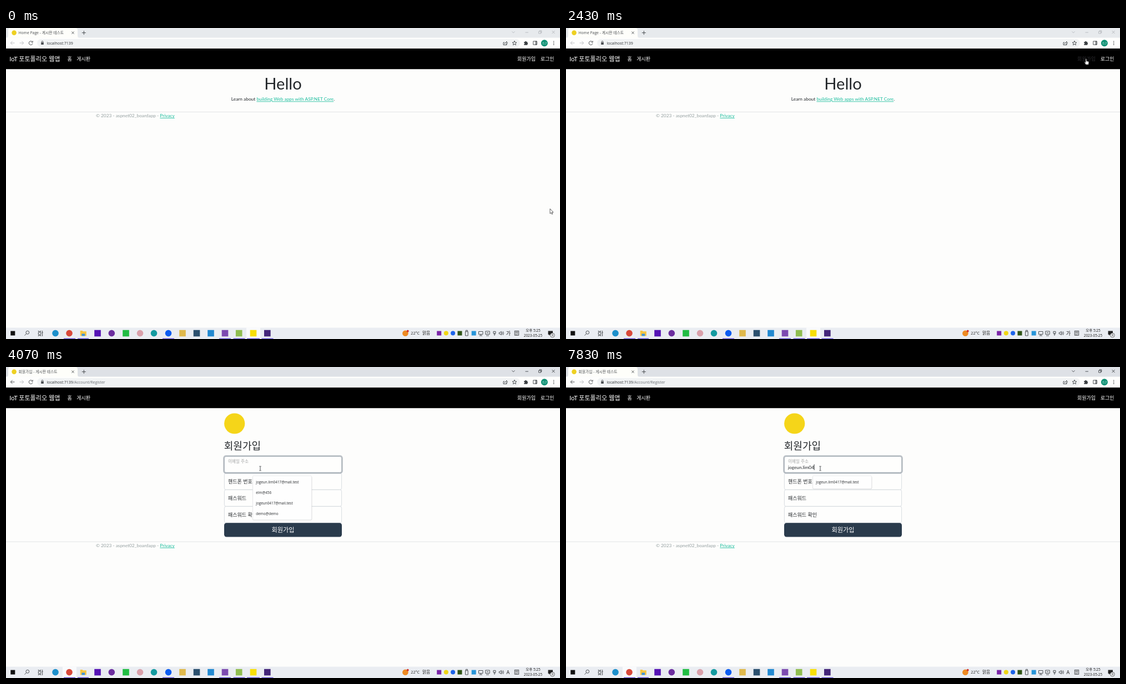
An HTML page for the animation above (8000 ms loop, 998 px wide and 561 px high).

```html
<!DOCTYPE html>
<html lang="ko">
<head>
<meta charset="utf-8">
<title>회원가입</title>
<style>
html, body { margin: 0; width: 100%; height: 100%; overflow: hidden; background: #fdfdfc; }
svg { display: block; width: 998px; height: 561px; font-family: Lato, "Noto Sans CJK KR", sans-serif; fill: #212529; }
.ui { font-family: "Open Sans", "Noto Sans CJK KR", sans-serif; }
.mid { text-anchor: middle; }
.link { fill: #18bc9c; text-decoration: underline; }
.line { fill: none; stroke: #3c4043; stroke-width: .9; }
.pale { stroke: #b4b7bb; }
.box { fill: #fefefd; stroke: #ced4da; stroke-width: .8; }

/* 1% of the loop is 80 ms */
.home, .register, .idle, .active, .tray-ko, .tray-off, .tray-en, .arrow, .hand, .beam {
  animation: 8s step-end infinite;
}
.home { animation-name: until-load; }
.register { animation-name: from-load; }
.idle { animation-name: until-click; }
.active { animation-name: from-click; }
.tray-ko { animation-name: until-click; }
.tray-off { animation-name: tray-off; }
.tray-en { animation-name: tray-en; }
.arrow { animation-name: arrow; }
.hand { animation-name: hand; }
.beam { animation-name: beam; }
@keyframes until-load { 0% { visibility: visible } 33%, 100% { visibility: hidden } }
@keyframes from-load { 0% { visibility: hidden } 33%, 100% { visibility: visible } }
@keyframes until-click { 0% { visibility: visible } 32%, 100% { visibility: hidden } }
@keyframes from-click { 0% { visibility: hidden } 32%, 100% { visibility: visible } }
@keyframes tray-off { 0% { visibility: hidden } 32% { visibility: visible } 44%, 100% { visibility: hidden } }
@keyframes tray-en { 0% { visibility: hidden } 44%, 100% { visibility: visible } }
@keyframes arrow {
  0% { visibility: visible } 27.4% { visibility: hidden }
  37.3% { visibility: visible } 39.8%, 100% { visibility: hidden }
}
@keyframes hand { 0% { visibility: hidden } 27.4% { visibility: visible } 37.3%, 100% { visibility: hidden } }
@keyframes beam { 0% { visibility: hidden } 39.8%, 100% { visibility: visible } }

.pointer { animation: move 8s ease-in-out infinite; }
@keyframes move {
  0%, 3% { transform: translate(980px, 326px) }
  17.5%, 20% { transform: translate(894.5px, 179px) }
  29.5%, 32.5% { transform: translate(937px, 55.5px) }
  35%, 36.3% { transform: translate(936px, 55.5px) }
  41%, 100% { transform: translate(458px, 183px) }
}
.join { animation: hover 8s linear infinite; }
@keyframes hover {
  0%, 27.4% { fill: #fff }
  29.3%, 32.99% { fill: #2b2b2f }
  33%, 100% { fill: #fff }
}
.ring { opacity: 0; animation: ring 8s ease-in-out infinite; }
@keyframes ring { 0%, 42.88% { opacity: 0 } 44.75%, 100% { opacity: 1 } }
.float { animation: float 8s ease-in-out infinite; }
@keyframes float {
  0%, 42.88% { transform: translate(400px, 179.3px); opacity: 1 }
  44.13%, 100% { transform: translate(400px, 172.7px) scale(.85); opacity: .42 }
}
</style>
</head>
<body>
<svg viewBox="0 0 998 561">
  <rect width="998" height="561" fill="#fdfdfc"/>

  <!-- tab strip -->
  <rect width="998" height="18" fill="#e7eaed"/>
  <rect class="active" width="998" height="18" fill="#dee1e6"/>
  <path d="M0 18Q4 18 4 14V4Q4 0 8 0H125Q129 0 129 4V14Q129 18 133 18Z" fill="#fefefa"/>
  <circle cx="14.6" cy="8.6" r="4.3" fill="#eed021"/>
  <g class="ui" font-size="6.8" fill="#4a4d51">
    <text class="home" x="22.5" y="11">Home Page - 게시판 테스트</text>
    <text class="register" x="22.5" y="11">회원가입 - 게시판 테스트</text>
  </g>
  <path class="line" d="M118.4 6.5l4.2 4.2m0-4.2l-4.2 4.2M136.8 8.6h7M140.3 5.1v7"/>
  <g id="controls">
    <path class="line pale idle" d="M911.5 6.3l2.5 2.5 2.5-2.5M935.5 8h5.4M983.6 5l5 5m0-5l-5 5M959.7 6.2h3.8v3.8h-3.8zM961 6v-1.2h3.8v3.8h-1.2"/>
    <path class="line active" d="M911.5 6.3l2.5 2.5 2.5-2.5M935.5 8h5.4M983.6 5l5 5m0-5l-5 5M959.7 6.2h3.8v3.8h-3.8zM961 6v-1.2h3.8v3.8h-1.2"/>
  </g>

  <!-- toolbar -->
  <rect y="17.5" width="998" height="19.5" fill="#fefefd"/>
  <rect x="56" y="20" width="870" height="14" rx="7" fill="#f1f3f4"/>
  <path class="line pale home" d="M15.5 27H8.3M11.6 23.7L8.3 27l3.3 3.3"/>
  <path class="line register" d="M15.5 27H8.3M11.6 23.7L8.3 27l3.3 3.3"/>
  <path class="line pale" d="M24.5 27h7.2M28.4 23.7l3.3 3.3-3.3 3.3"/>
  <path class="line" stroke-width="1.1" d="M47.3 24.9a3.4 3.4 0 1 0 .7 3M48.2 23.3v2.5h-2.5"/>
  <rect x="63.2" y="26" width="4.6" height="4" rx=".6" fill="#4a4d51"/>
  <path class="line" d="M64.2 26v-1.2a1.3 1.3 0 0 1 2.6 0V26"/>
  <text class="ui" x="73.5" y="29.5" font-size="7" fill="#303336">localhost:7139<tspan class="register" fill="#6b6f74">/Account/Register</tspan></text>
  <g class="line" stroke-width=".8">
    <path d="M898 26h-2v4.5h6V29M898 29q.4-3 3.5-3v-1.8l2 2.6-2 2.5v-1.7"/>
    <path d="M916 23.2l1.1 2.7 2.8.2-2.2 1.8.8 2.8-2.5-1.6-2.5 1.6.8-2.8-2.2-1.8 2.8-.2z"/>
    <path d="M949.8 23.9h6.4v6.2h-6.4zM954 24v6h2v-6z"/>
  </g>
  <path d="M933.2 25h1.8a1.3 1.3 0 0 1 2.6 0h1.7v1.7a1.3 1.3 0 0 1 0 2.5v1.6h-6.1V29a1 1 0 0 0 0-2.2z" fill="#3c4043"/>
  <circle cx="969.9" cy="27.2" r="6" fill="#0b8f72"/>
  <text class="ui mid" x="969.9" y="28.8" font-size="4.6" fill="#e5f5f0">조근</text>
  <g fill="#3c4043"><circle cx="986.7" cy="24.3" r=".8"/><circle cx="986.7" cy="27.1" r=".8"/><circle cx="986.7" cy="29.9" r=".8"/></g>

  <!-- site navigation -->
  <rect y="37" width="998" height="37.2" fill="#000"/>
  <g fill="#fff" font-size="9">
    <text x="6.3" y="59.6" font-size="11.1">IoT 포토폴리오 웹앱</text>
    <text x="110.5" y="58.8">홈</text>
    <text x="127.3" y="58.8">게시판</text>
    <text class="join" x="921" y="58.8">회원가입</text>
    <text x="962.8" y="58.8">로그인</text>
  </g>

  <g class="home">
    <text class="mid" x="499" y="111.2" font-size="29.1">Hello</text>
    <text class="mid" x="499" y="131.4" font-size="8.32">Learn about <tspan class="link">building Web apps with ASP.NET Core</tspan>.</text>
  </g>

  <g class="register">
    <circle cx="411.7" cy="102" r="18.6" fill="#f5d519"/>
    <text x="392.8" y="148.6" font-size="18" font-weight="300">회원가입</text>
    <rect class="box" x="393.4" y="161.4" width="211.2" height="30" rx="3"/>
    <rect class="box" x="393.4" y="191.4" width="211.2" height="30" rx="3"/>
    <rect class="box" x="393.4" y="221.4" width="211.2" height="30" rx="3"/>
    <rect class="box" x="393.4" y="251.4" width="211.2" height="30" rx="3"/>
    <g class="ring" fill="none">
      <rect x="392.2" y="160.2" width="213.6" height="31.2" rx="4" stroke="#2c3e50" stroke-opacity=".3" stroke-width="2.1"/>
      <rect x="393.4" y="161.4" width="211.2" height="28.8" rx="3" stroke="#969fa8" stroke-width=".6"/>
    </g>
    <g font-size="9">
      <text class="float">이메일 주소</text>
      <text x="400" y="209.5">핸드폰 번호</text>
      <text x="400" y="239.7">패스워드</text>
      <text x="400" y="269.8">패스워드 확인</text>
    </g>
    <rect x="393" y="281.3" width="212" height="25.2" rx="4.2" fill="#2a3b4c"/>
    <text class="mid" x="499" y="297.9" font-size="11.2" fill="#fff">회원가입</text>
    <text id="typed" x="400" y="184" font-size="8.32"></text>
    <rect id="caret" y="175.6" width=".9" height="10.4"/>
  </g>

  <!-- footer, lower on the form page -->
  <g id="footer" class="home">
    <rect y="151" width="998" height=".8" fill="#dcdfe1"/>
    <text x="162" y="161" font-size="8.32" fill="#95a0a1">© 2023 - aspnet02_boardapp - <tspan class="link">Privacy</tspan></text>
  </g>
  <g class="register" transform="translate(0 163.8)">
    <rect y="151" width="998" height=".8" fill="#dcdfe1"/>
    <text x="162" y="161" font-size="8.32" fill="#95a0a1">© 2023 - aspnet02_boardapp - <tspan class="link">Privacy</tspan></text>
  </g>

  <!-- autofill suggestions -->
  <g id="list">
    <rect id="shade" x="444" y="197" width="107.4" rx="2.5" fill="#000" fill-opacity=".13"/>
    <rect id="sheet" x="444.4" y="196.2" width="106.2" rx="2" fill="#fefefe" stroke="#dfe1e4" stroke-width=".6"/>
    <g id="items" class="ui" font-size="6.4" fill="#25282b"></g>
  </g>

  <!-- taskbar -->
  <rect y="540.6" width="998" height="20.4" fill="#eaedf2"/>
  <rect class="idle" x="433" y="540.6" width="25" height="20.4" fill="#f9fafc"/>
  <rect class="active" x="102" y="540.6" width="25" height="20.4" fill="#f9fafc"/>
  <path d="M104 560.3h21M129 560.3h20M282 560.3h21M384 560.3h21M409.5 560.3h21M434 560.3h23M460.5 560.3h21" stroke="#6350d6" stroke-width="1.3"/>
  <rect x="8.3" y="546.6" width="8" height="8" fill="#111"/>
  <g class="line" stroke-width="1">
    <circle cx="38.8" cy="549.3" r="2.9"/><path d="M36.7 551.4l-3.2 3.3"/>
    <path d="M58.3 549h4.6v4h-4.6zM58.3 546v1.3h4.6V546M58.3 556v-1.3h4.6v1.3M65.6 546v10M64.6 549.5h2"/>
  </g>
  <path d="M133.7 546h4l1 1.3h6.1v8.2h-11.1z" fill="#f5c542"/>
  <rect x="136.4" y="551.5" width="5.8" height="4" fill="#3b92dc"/>
  <g id="apps"></g>
  <circle cx="719.4" cy="550.8" r="5.3" fill="#ee8a22"/>
  <circle cx="723.7" cy="546.7" r="2" fill="#d3322e"/>
  <g class="ui" font-size="7.2" fill="#222">
    <text x="729.3" y="553.2">22°C</text>
    <text x="750" y="553.2" font-size="7.7">맑음</text>
  </g>
  <g class="line" stroke-width=".9">
    <path d="M828.4 547.7v-2.3h3v2.3M827.6 547.7h4.6v7.3h-4.6z"/>
    <path d="M851.5 547.5h7.5v5h-7.5zM855.3 552.5v2.3M852.5 555h5.5"/>
    <path d="M863.8 547h7.4v5.5h-7.4zM866 549.7h3M865 555h5"/>
    <path d="M878 547.4h4v3.4h-4zM878.5 552h3.4M880 552v3"/>
    <path d="M888.3 549.3h1.7l2.2-2v6.6l-2.2-2h-1.7zM893.7 548.6q1.4 2 0 4M895.3 547.3q2.3 3.3 0 6.6"/>
    <path class="tray-off pale" d="M900.8 550.5a3.7 3.7 0 1 0 7.4 0a3.7 3.7 0 1 0-7.4 0M903 549l3 3m0-3l-3 3"/>
    <rect x="916.3" y="546.6" width="7.4" height="7.6"/>
  </g>
  <g class="ui mid" fill="#1c1c1c">
    <text class="tray-ko" x="904.8" y="553.8" font-size="9">가</text>
    <text class="tray-en" x="904.4" y="553.9" font-size="9">A</text>
    <text x="920" y="552.9" font-size="6.4">한</text>
    <text x="949.5" y="548.3" font-size="6.5">오후 5:25</text>
    <text x="949.5" y="557.2" font-size="6.4">2023-05-25</text>
  </g>
  <path d="M976.6 546.5h8.4v6.6h-5l-1.8 2v-2h-1.6z" fill="#222"/>
  <circle cx="984.4" cy="554.2" r="3.9" fill="#eef0f3" stroke="#333" stroke-width=".7"/>
  <text class="ui mid" x="984.4" y="556.3" font-size="6" fill="#222">9</text>

  <g class="pointer">
    <path class="arrow" d="M0 0V8.8L2 7l1.4 3 1.4-.6-1.3-3H6z" fill="#fff" stroke="#222" stroke-width=".7"/>
    <path class="hand" d="M-.9.6q.8-1.1 1.6 0V4.2l3.3.7q1 .4.8 1.7L4.2 10.5H-.4L-3 6.6q.1-1.2 1.2-.5l.9.9z" fill="#fff" stroke="#333" stroke-width=".6"/>
    <path class="beam line" d="M-1.7-3.8h1.2l.5.4.5-.4h1.2M0-3.4v6.8M-1.7 3.8h1.2l.5-.4.5.4h1.2"/>
  </g>
</svg>

<script>
const LOOP = 8000, FOCUS = 3500;
const email = "jogeun.lim0417@mail.test";
const short = "jogeun0417@mail.test";
// [time, letters typed]
const keys = [[FOCUS, 0], [5500, 2], [5700, 3], [5730, 4], [6470, 5], [6500, 6],
  [6720, 7], [6970, 8], [7120, 9], [7370, 10], [7700, 11], [7830, 12]];
const lists = [[0, []], [3600, [email, "elm@456", short, "demo@demo"]], [6070, [email, short]], [6770, [email]]];
const $ = id => document.getElementById(id);
const at = (steps, t) => steps.filter(s => s[0] <= t).pop();

function add(parent, tag, attrs) {
  const el = document.createElementNS("http://www.w3.org/2000/svg", tag);
  for (const name in attrs) el.setAttribute(name, attrs[name]);
  return parent.appendChild(el);
}

function icon(x, fill, round, r) {
  if (round) add($("apps"), "circle", { cx: x, cy: 550.6, r, fill });
  else add($("apps"), "rect", { x: x - r, y: 550.6 - r, width: 2 * r, height: 2 * r, fill });
}

[[89, "#1c8fcb", 1], [114, "#d9493a", 1], [165, "#5513b4"], [190.3, "#6b2d9e", 1], [216, "#22bd43"],
 [241.5, "#d9a0aa", 1], [266.5, "#139aa0", 1], [292.5, "#0b5cf0", 1], [318, "#dfb84b"], [343.5, "#2b506e"],
 [369, "#2389d0"], [394.5, "#7d4bb0"], [419.7, "#8fbd50"], [445.5, "#f8df08"], [470.8, "#432579"]]
  .forEach(([x, fill, round]) => icon(x, fill, round, 5.8));
[[780.2, "#7a24a8"], [792.8, "#f0d513", 1], [805.1, "#1d63ea", 1], [817.5, "#2f5416"], [842.7, "#2794d8"]]
  .forEach(([x, fill, round]) => icon(x, fill, round, 4));

const rows = [0, 1, 2, 3].map(i => add($("items"), "text", { x: 450.3, y: 210.3 + 18.75 * i }));

function draw(t) {
  const [last, count] = at(keys, t) || [0, 0];
  $("typed").textContent = email.slice(0, count);
  const width = count ? $("typed").getComputedTextLength() : 0;
  $("caret").setAttribute("x", 399.6 + width);
  $("caret").style.opacity = t >= FOCUS && (t - last) % 1000 < 500 ? 1 : 0;

  const shown = at(lists, t)[1];
  const height = 18.75 * shown.length + 4.6;
  $("list").style.display = shown.length ? "" : "none";
  $("sheet").setAttribute("height", height);
  $("shade").setAttribute("height", height);
  rows.forEach((row, i) => row.textContent = shown[i] || "");
}

let start;
function tick(now) {
  start ??= now;
  draw((now - start) % LOOP);
  requestAnimationFrame(tick);
}
draw(0);
requestAnimationFrame(tick);
</script>
</body>
</html>
```
